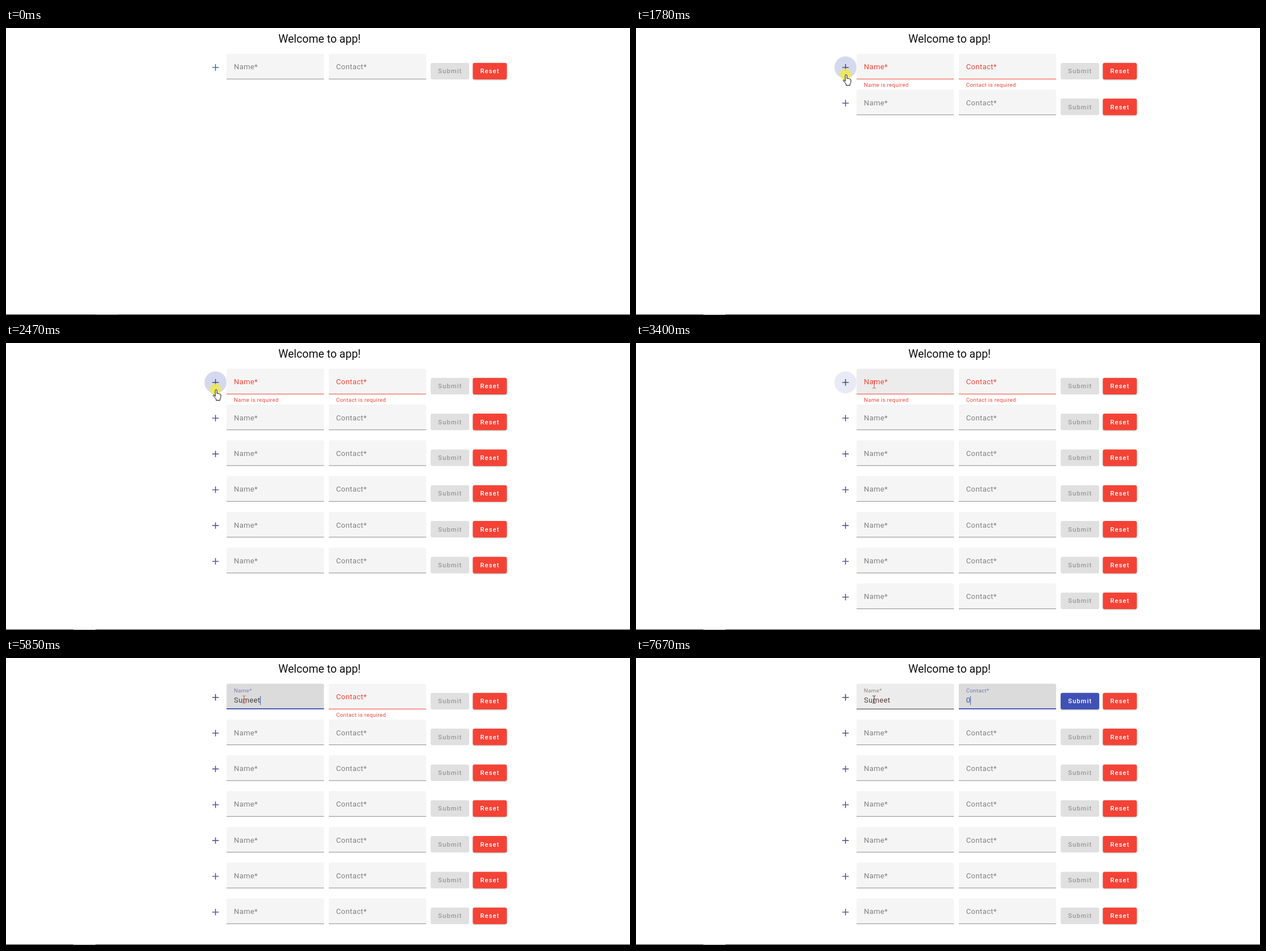
Animation, 1102 px wide and 508 px high, one loop 8 s. Source, as an HTML page:

```html
<!DOCTYPE html>
<html lang="en">
<head>
<meta charset="utf-8">
<title>Form</title>
<style>
  html, body { margin: 0; height: 100%; overflow: hidden; background: #fff; }
  svg { display: block; width: 100%; height: 100%; }
  text { font: 13px Roboto, sans-serif; letter-spacing: .03125em; white-space: pre; }
  .title { font-size: 19.5px; letter-spacing: 0; }
  .small { font-size: 9.75px; letter-spacing: .0333em; }
  .btn { font-size: 11.375px; font-weight: 500; letter-spacing: .0893em; }
  .raised { filter: drop-shadow(0 1.4px 1px rgba(0, 0, 0, .28)); }
</style>
</head>
<body>
<svg id="stage" viewBox="0 0 1102 508"></svg>
<script>
const stage = document.getElementById('stage');
const LOOP = 8000, PITCH = 63.35;
const RED = '#f44336', BLUE = '#3f51b5', GREY = '#808080';
const rowTimes = [0, 1450, 1790, 2030, 2190, 2350, 2540];
const nameTimes = [4930, 5330, 5460, 5600, 5720, 5850];
const presses = [[1310, 1390], [1710, 1790], [1950, 2030], [2110, 2190], [2270, 2350], [2470, 2540]];
const path = [
  [250, 993, 480], [330, 900, 400], [410, 740, 270], [490, 570, 160],
  [570, 430, 85], [640, 380, 64], [720, 369, 82], [3270, 433, 84], [3400, 420.5, 73]
];

const count = (times, t) => times.filter(s => t >= s).length;
const within = (t, spans) => spans.some(([a, b]) => t >= a && t < b);
const rect = (x, y, w, h, fill, extra = '') =>
  `<rect x="${x}" y="${y}" width="${w}" height="${h}" fill="${fill}" ${extra}/>`;
const text = (x, y, s, fill, cls = '', extra = '') =>
  `<text x="${x}" y="${y}" fill="${fill}" class="${cls}" ${extra}>${s}</text>`;

function plus(y, color) {
  return `<path d="M364.3 ${y + 24.2}h11.4m-5.7-5.7v11.4" stroke="${color}" stroke-width="1.6"/>`;
}

function button(x, y, w, label, bg, fg, raised) {
  return rect(x, y + 16.2, w, 29.25, bg, `rx="3.25" ${raised ? 'class="raised"' : ''}`) +
    text(x + 13, y + 34.7, label, fg, 'btn');
}

function field(x, y, label, o = {}) {
  const { bg = '#f5f5f5', color = GREY, line = '#8e8e8e', focus, lift = 0,
          value = '', ink = '#444', caret, caretColor = color, error } = o;
  const top = y, bottom = y + 45.3, w = 172, thick = focus ? 1.8 : 1;
  let s = `<path d="M${x} ${bottom}V${top + 3.25}q0-3.25 3.25-3.25h${w - 6.5}q3.25 0 3.25 3.25V${bottom}z" fill="${bg}"/>`;
  s += rect(x, bottom - thick, w, thick, line);
  s += text(x + 13, y + 27.7 - 12 * lift, label, color, '', `style="font-size:${13 - 3.25 * lift}px"`);
  if (value || caret) {
    const bar = caret ? `<rect class="caret" x="${x + 13}" y="${y + 21.7}" width="1" height="16" fill="${caretColor}"/>` : '';
    s += text(x + 13, y + 33.4, value, ink, 'value') + bar;
  }
  if (error) s += text(x + 13, y + 58.5, error, RED, 'small');
  return s;
}

function nameState(t) {
  if (t < 1450) return {};
  if (t >= 6010) return { bg: '#ececec', color: '#938585', line: '#333', lift: 1, value: 'Sumeet', ink: '#5a403d' };
  const typed = count(nameTimes, t), focus = t >= 3600;
  return {
    focus,
    bg: focus ? '#dbdbdb' : t >= 3400 ? '#ececec' : '#f5f5f5',
    color: typed ? '#7a80b8' : RED,
    line: typed ? BLUE : RED,
    lift: t >= 3670 ? 1 : focus ? .5 : 0,
    value: 'Sumeet'.slice(0, typed),
    caret: within(t, [[3670, 4200], [4730, 6010]]),
    caretColor: typed ? BLUE : RED,
    error: typed ? '' : 'Name is required'
  };
}

function contactState(t) {
  if (t < 1450) return {};
  const focus = t >= 6010, typed = t >= 7600;
  return {
    focus,
    bg: focus ? '#dbdbdb' : '#f5f5f5',
    color: typed ? '#7078b8' : RED,
    line: typed ? BLUE : RED,
    lift: focus ? 1 : 0,
    value: typed ? '0' : '',
    ink: '#4a5299',
    caret: within(t, [[6010, 6610], [7070, LOOP]]),
    caretColor: typed ? BLUE : RED,
    error: typed ? '' : 'Contact is required'
  };
}

function cursor(t) {
  const at = path.filter(p => t >= p[0]).pop();
  if (!at) return '';
  const [start, x, y] = at;
  if (start === 3400) {
    const color = t < 6010 ? '#d9534a' : '#4a3532';
    return `<path d="M${x - 3} ${y - 6}h2q1 0 1 1q0-1 1-1h2M${x} ${y - 5}v11m-3 1h2q1 0 1-1q0 1 1 1h2" fill="none" stroke="${color}"/>`;
  }
  const hand = t >= 920 && t < 3270;
  const shape = hand
    ? 'M4.5 12.5V2.2a1.5 1.5 0 0 1 3 0V7.5q1.5-1.3 2.6.3q1.5-.8 2.3.6q2-.3 2.1 1.6V13q0 2-1.5 4v2.5H6V17L1 11.5q-.6-1.8 1.2-1.8z'
    : 'M.5 .5V15.5L4 12.2L6.4 17.5L8.8 16.5L6.5 11.3H11.3z';
  return `<path transform="translate(${hand ? 365 : x} ${y})" d="${shape}" fill="#fff" stroke="#111"/>`;
}

function draw(t) {
  const rows = count(rowTimes, t), pressed = within(t, presses);
  let s = text(481, 26, 'Welcome to app!', '#111', 'title');

  if (t >= 920 && t < 3600) {
    const tint = t < 1310 ? '#f7f8fc' : t < 2540 ? '#d5d9ef' : '#e8eaf6';
    s += `<circle cx="370" cy="69.7" r="19.5" fill="${tint}"/>`;
  }
  for (let i = 0; i < rows; i++) {
    const y = 45.5 + i * PITCH, first = i === 0;
    const ready = first && t >= 7600;
    s += plus(y, !first ? '#5c589a' : t < 1310 ? '#41749f' : t < 1450 ? '#4a58ac' : '#504c78');
    s += field(389.5, y, 'Name*', first ? nameState(t) : {});
    s += field(570, y, 'Contact*', first ? contactState(t) : {});
    s += button(750, y, 68, 'Submit', ready ? (t < 7670 ? '#7a86c8' : BLUE) : '#e0e0e0', ready ? '#fff' : '#999', ready);
    s += button(824.5, y, 60, 'Reset', RED, '#fff', true);
  }

  s += rect(0, 507, 1102, 1, '#2b2b2b');
  if (t < 1310) s += rect(158, 507, 40, 1, '#555');
  if (t >= 1450) s += rect(119, 507, 39, 1, '#a0a0a0');
  if (pressed) s += '<circle cx="370" cy="82" r="10" fill="#f0e84e" fill-opacity=".85"/>';
  stage.innerHTML = s + cursor(t);

  // Carets follow the measured end of the typed text.
  for (const bar of stage.querySelectorAll('.caret')) {
    const value = bar.previousElementSibling;
    if (value.textContent) bar.setAttribute('x', +value.getAttribute('x') + value.getComputedTextLength() - .5);
  }
}

const begin = performance.now();
function tick() {
  draw((performance.now() - begin) % LOOP);
  requestAnimationFrame(tick);
}
tick();
</script>
</body>
</html>
```
